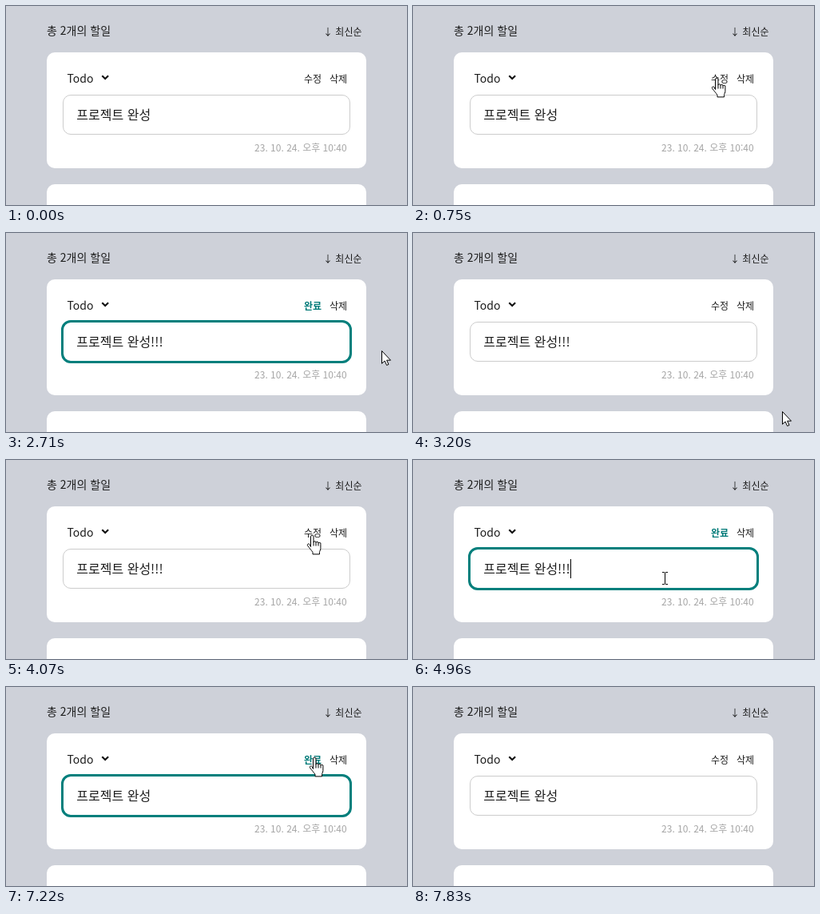
Recreate the animation shown at these times as an HTML page. Size 502 by 249 pixels, loop 9160 ms.

```html
<!DOCTYPE html>
<html lang="ko">
<head>
<meta charset="utf-8">
<title>할일</title>
<style>
  html, body { margin: 0; height: 100%; overflow: hidden; background: #ced1d9; }
  svg { display: block; width: 502px; height: 249px; }
  text { font: 12px 'Noto Sans CJK KR', 'Noto Sans KR', 'Noto Sans CJK', 'Noto Sans CJK JP', sans-serif; fill: #1c1c1c; }
  #head, #status { font-size: 14px; }
  #task { font-size: 16px; }
  #date { fill: #a5a5a5; text-anchor: end; }
  .editing #action { fill: #007a78; font-weight: 700; }
  #field { fill: #fff; stroke: #ccc; }
  #ring { fill: none; stroke: #007f7c; stroke-width: 3; display: none; }
  .editing #ring { display: inline; }
  #cursor path { fill: #fff; stroke: #000; stroke-linejoin: round; }
</style>
</head>
<body>
<svg id="stage" viewBox="0 0 502 249">
  <text id="head" x="51" y="36">총 2개의 할일</text>
  <text x="397" y="37">↓ 최신순</text>
  <g fill="#fff">
    <rect x="51" y="58" width="400" height="145" rx="10"/>
    <rect x="51" y="223" width="400" height="145" rx="10"/>
  </g>
  <text id="status" x="76.5" y="96">Todo</text>
  <path d="M120.3 87.2l3.9 3.9 3.9-3.9" fill="none" stroke="#111" stroke-width="2.1"/>
  <text id="action" x="373" y="96">수정</text>
  <text x="405" y="96">삭제</text>
  <rect id="field" x="71.5" y="111.5" width="359" height="49" rx="9.5"/>
  <rect id="ring" x="70.5" y="110.5" width="361" height="51" rx="10.5"/>
  <text id="task" x="88.3" y="142">프로젝트 완성</text>
  <rect id="caret" y="124" width="1" height="24"/>
  <text id="date" x="426.6" y="182">23. 10. 24. 오후 10:40</text>
  <g id="cursor">
    <path id="arrow" d="M.5.5V16.3L4.1 13l2.5 5.5 2.4-1.1-2.4-5.2h4.9Z"/>
    <path id="hand" transform="translate(-6.5 -1.5)" d="M5 15V2.4a1.75 1.75 0 0 1 3.5 0V9.5a1.5 1.5 0 0 1 3 .5a1.5 1.5 0 0 1 3 .8a1.45 1.45 0 0 1 2.9.9V17c0 2.2-1.4 3.4-1.4 5v2.4H7.5V22C6 19.5 3.2 16.6 1.2 13.8c-1.2-2 1.1-3.2 2.3-1.8ZM8.5 9.5V14M11.5 10V14M14.5 10.8V14"/>
    <path id="beam" transform="translate(.5 0)" d="M-3.5-7.5h3m1 0h3M0-7V7M-3.5 7.5h3m1 0h3"/>
  </g>
</svg>
<script>
const LOOP = 9160, BLINK = 530, ENTER = 70, LEAVE = 7830;
const el = id => document.getElementById(id);

const opened = [890, 4560], closed = [3200, 7490];
const typed = [1550, 1820, 1960], erased = [5690, 5820, 6020];
const count = (times, t) => times.filter(s => s <= t).length;

// Pointer strokes: each eases out from wherever the last one stopped
const origin = [454, 243];
const strokes = [
  { from: ENTER, to: 750, x: 380, y: 91 },   // edit button
  { from: 960, to: 1490, x: 304, y: 145 },   // text field
  { from: 1960, to: 2640, x: 470, y: 147 },  // beside the card
  { from: 2900, to: 3200, x: 462, y: 223 },
  { from: 3700, to: 4070, x: 383, y: 95 },   // edit button
  { from: 4560, to: 4800, x: 348, y: 164 },
  { from: 4800, to: 5090, x: 307, y: 144 },  // text field
  { from: 6350, to: 6420, x: 329, y: 136 },
  { from: 6490, to: 6850, x: 458, y: 130 },
  { from: 6850, to: 7290, x: 384, y: 88 },   // done button
  { from: 7490, to: LEAVE, x: 440, y: 190 }
];

function pointer(t) {
  let [x, y] = origin;
  for (const s of strokes) {
    const k = Math.min(1, Math.max(0, (t - s.from) / (s.to - s.from)));
    const ease = k * (2 - k);
    x += (s.x - x) * ease;
    y += (s.y - y) * ease;
  }
  return [Math.round(x), Math.round(y)];
}

function shape(x, y) {
  if (x > 367 && x < 433 && y > 72 && y < 100) return 'hand';
  if (x > 71 && x < 431 && y > 111 && y < 161) return 'beam';
  return 'arrow';
}

const show = (id, on) => el(id).setAttribute('visibility', on ? 'visible' : 'hidden');

function draw(t) {
  const editing = count(opened, t) > count(closed, t);
  el('stage').classList.toggle('editing', editing);
  el('action').textContent = editing ? '완료' : '수정';

  const task = el('task');
  task.textContent = '프로젝트 완성' + '!'.repeat(count(typed, t) - count(erased, t));
  const lastInput = Math.max(...[...opened, ...typed].filter(s => s <= t));
  show('caret', editing && Math.floor((t - lastInput) / BLINK) % 2 === 0);
  el('caret').setAttribute('x', Math.round(88.3 + task.getComputedTextLength()));

  const at = pointer(t);
  const current = t >= ENTER && t < LEAVE && shape(...at);
  for (const id of ['arrow', 'hand', 'beam']) show(id, id === current);
  el('cursor').setAttribute('transform', `translate(${at})`);
}

const start = performance.now();
function tick() {
  draw((performance.now() - start) % LOOP);
  requestAnimationFrame(tick);
}
tick();
</script>
</body>
</html>
```
